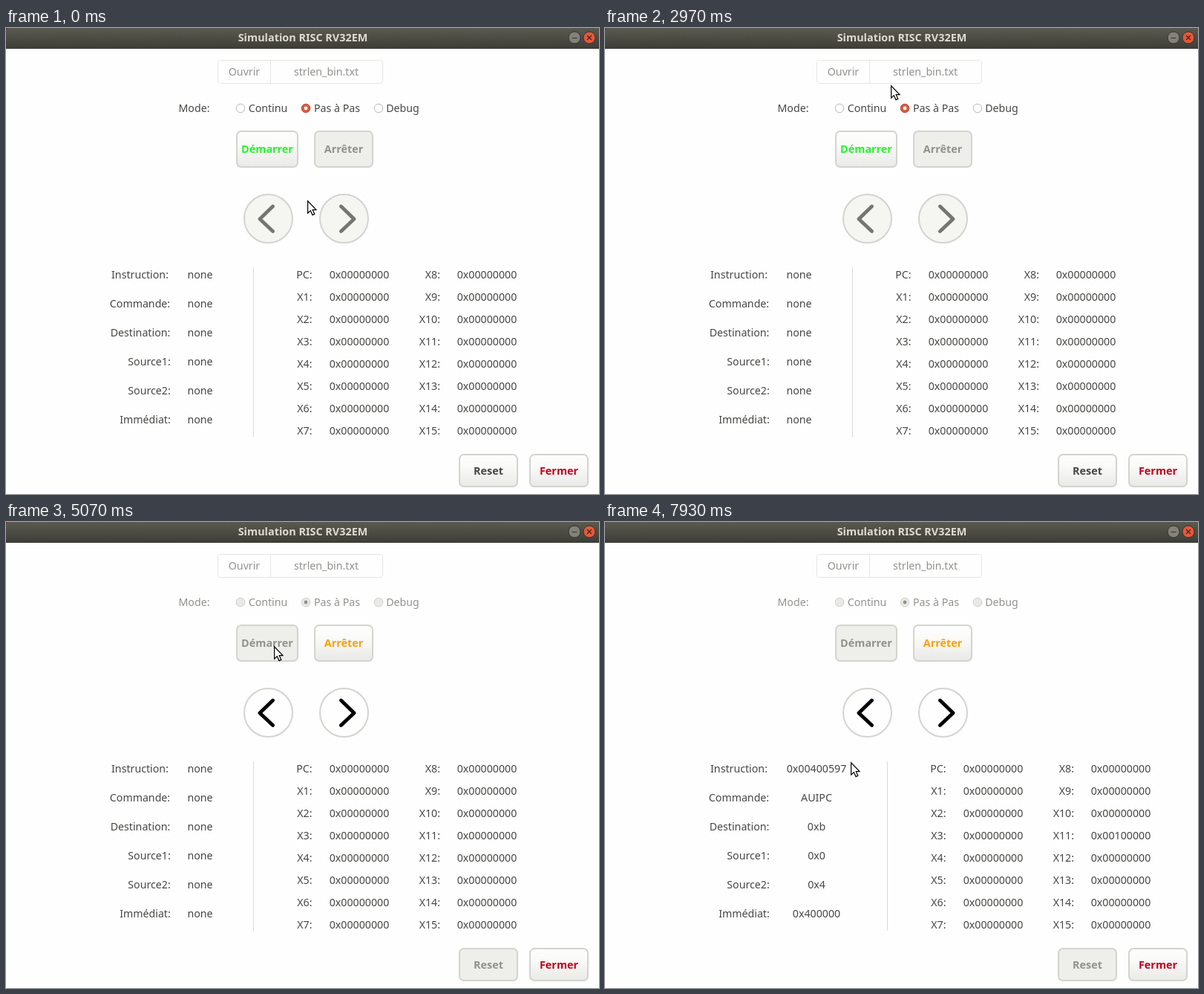
Recreate the animation shown at these times as an HTML page. Size 799 by 627 pixels, loop 8 s.

```html
<!DOCTYPE html>
<html lang="fr">
<head>
<meta charset="utf-8">
<title>Simulation RISC RV32EM</title>
<style>
html, body { margin: 0; width: 100%; height: 100%; overflow: hidden; background: #fefefe; }
svg { display: block; width: 799px; height: 627px; }
text { font: 14.2px "Noto Sans", "Open Sans", sans-serif; fill: #474744; }
.b { font-weight: 700; font-size: 14.4px; }
</style>
</head>
<body>
<svg id="stage" viewBox="0 0 799 627">
  <defs>
    <linearGradient id="bar" x2="0" y2="1">
      <stop stop-color="#5b5a50"/><stop offset="1" stop-color="#3d3d37"/>
    </linearGradient>
    <linearGradient id="face" x2="0" y2="1">
      <stop stop-color="#fefefe"/><stop offset=".35" stop-color="#fafaf9"/><stop offset="1" stop-color="#e9e9e6"/>
    </linearGradient>
    <linearGradient id="hover" gradientUnits="userSpaceOnUse" x1="0" y1="160" x2="0" y2="167">
      <stop stop-color="#1f7a22"/><stop offset="1" stop-color="#1fc923"/>
    </linearGradient>
  </defs>
</svg>
<script>
const NS = "http://www.w3.org/2000/svg";
const stage = document.getElementById("stage");
const LOOP = 8000;
const INK = "#474744", DIM = "#91918d", EDGE = "#d3d3cf", FLAT = "#eeeeeb";

function set(el, attrs) {
  for (const key in attrs) el.setAttribute(key, attrs[key]);
  return el;
}

function add(tag, attrs, parent = stage) {
  return parent.appendChild(set(document.createElementNS(NS, tag), attrs));
}

function label(str, x, y, anchor = "middle", cls = "", parent = stage) {
  const el = add("text", { x, y, "text-anchor": anchor, class: cls }, parent);
  el.textContent = str;
  return el;
}

const paint = (el, fill) => { el.style.fill = fill; };

function button(str, x, y, width, height) {
  const box = add("rect", { x, y, width, height, rx: 6, fill: "url(#face)", stroke: EDGE, "stroke-width": 2 });
  const text = label(str, x + width / 2, y + height / 2 + 5, "middle", "b");
  return (on, color, fill = "url(#face)") => {
    set(box, { fill: on ? fill : FLAT });
    paint(text, on ? color : DIM);
  };
}

function arrow(cx, tip, end) {
  const ring = add("circle", { cx, cy: 256.5, r: 32.5, "stroke-width": 2 });
  const mark = add("path", {
    d: `M${end} 240L${tip} 257L${end} 273.5`, fill: "none",
    "stroke-width": 4.8, "stroke-linecap": "round", "stroke-linejoin": "round"
  });
  return (on, edge) => {
    set(ring, { fill: on ? "#fefefe" : "#f5f5f2", stroke: edge });
    set(mark, { stroke: on ? "#000" : "#757571" });
  };
}

// Title bar
add("rect", { width: 8, height: 8, fill: "#7c1f24" });
add("path", { d: "M0 28V4Q0 0 4 0H799V28Z", fill: "url(#bar)" });
paint(label("Simulation RISC RV32EM", 400, 18, "middle", "b"), "#dfdbd2");
add("circle", { cx: 766, cy: 13, r: 8, fill: "#82817a", stroke: "#35342f" });
add("path", { d: "M762.5 13.5H769.5", stroke: "#35342f" });
add("circle", { cx: 786, cy: 13, r: 8, fill: "#e5593a", stroke: "#35342f" });
add("path", { d: "M783 10L789 16M789 10L783 16", stroke: "#45231a", "stroke-width": 1.2 });

// File chooser
add("rect", { x: 285.5, y: 43.5, width: 222, height: 31, rx: 3, fill: "none", stroke: "#e5e5e2" });
add("path", { d: "M356.5 44V74", stroke: "#e5e5e2" });
paint(label("Ouvrir", 321, 64), DIM);
paint(label("strlen_bin.txt", 431.5, 64), DIM);

// Mode selector
const modeTexts = [label("Mode:", 253.5, 113)];
const radios = [["Continu", 316, 353], ["Pas à Pas", 404, 446], ["Debug", 502, 534.5]].map(([str, cx, mid]) => {
  modeTexts.push(label(str, mid, 113));
  return add("circle", { cx, cy: 108, r: 5.8 });
});
const dot = add("circle", { cx: 404, cy: 108, r: 2.4 });

// Controls
const start = button("Démarrer", 311, 139, 82, 48);
const stop = button("Arrêter", 416, 139, 78, 48);
const reset = button("Reset", 611, 574, 78, 43);
button("Fermer", 706, 574, 78, 43)(true, "#c4001a");
const back = arrow(353.5, 342, 359.5);
const next = arrow(455.5, 469, 451.5);

// Decoded instruction
const fields = [
  ["Instruction:", 180.5, "0x00400597"],
  ["Commande:", 180.5, "AUIPC"],
  ["Destination:", 181, "0xb"],
  ["Source1:", 193, "0x0"],
  ["Source2:", 193, "0x4"],
  ["Immédiat:", 187.5, "0x400000"]
].map(([str, x, value], i) => {
  const y = 337 + 39 * i;
  label(str, x, y);
  return { el: label("none", 261.5, y), value };
});

// Registers
const bank = add("g", {});
add("path", { d: "M333.5 322V550", stroke: "#d9d9d6" }, bank);
const regs = Array.from({ length: 16 }, (_, i) => {
  const right = i > 7, y = 337 + 30 * (i % 8);
  label(i ? `X${i}:` : "PC:", right ? 585 : 412.5, y, "end", "", bank);
  return label("0x00000000", right ? 648 : 476, y, "middle", "", bank);
});

const pointer = add("path", {
  d: "M.6 .8V17.2L4.3 13.8L7 19.6L9.8 18.4L7.2 12.7H12Z",
  fill: "#fff", stroke: "#000", "stroke-width": 1.2
});

// Pointer keys: time, x, y
const path = [
  [0, 406, 232], [200, 408, 228], [400, 408, 228], [800, 407, 214], [970, 407, 214],
  [1270, 448, 155], [1470, 432, 112], [1670, 388, 85], [1770, 384, 84], [1970, 388, 90],
  [2270, 455, 78], [2470, 494, 72], [2670, 484, 73], [2770, 465, 69], [2970, 385, 77],
  [3270, 374, 108], [3570, 391, 147], [3670, 391, 146], [3870, 374, 173], [4070, 361, 169],
  [4170, 361, 169], [4270, 361, 167], [5270, 361, 167], [5870, 448, 254], [6170, 448, 254],
  [6270, 449, 255], [6370, 449, 255], [6400, 450, 256], [7300, 450, 256], [7900, 331, 323]
];

function snap(t) {
  const shift = t >= 1030 && t < 6400 ? 70 : 0;
  return Math.floor((t - shift) / 100) * 100 + shift;
}

function pointerAt(t) {
  const i = path.findIndex(key => key[0] > t);
  if (i < 0) return path[path.length - 1].slice(1);
  const a = path[i - 1], b = path[i];
  const u = (t - a[0]) / (b[0] - a[0]);
  return [1, 2].map(k => Math.round(a[k] + (b[k] - a[k]) * u));
}

function draw(t) {
  const running = t >= 5070, stepped = t >= 7000;
  const [x, y] = pointerAt(snap(t));
  set(pointer, { transform: `translate(${x} ${y})` });

  modeTexts.forEach(el => paint(el, running ? DIM : INK));
  radios.forEach((el, i) => {
    const picked = i === 1 && !running;
    set(el, {
      fill: running ? "#e9e9e6" : picked ? "#dc5a3c" : "#fff",
      stroke: running ? "#cfcfcb" : picked ? "#b94a31" : "#b9b9b5"
    });
  });
  set(dot, { fill: running ? "#91918d" : "#fff" });

  const over = x > 310 && x < 394 && y > 138 && y < 188;
  start(!running, over ? "url(#hover)" : "#27f32c", t >= 4900 ? "#e9e9e6" : "url(#face)");
  stop(running, "#f3a30f");
  reset(!running, INK);

  const inRing = Math.hypot(x - 455.5, y - 256.5) < 33;
  const ring = t >= 7030 || !inRing ? EDGE : t >= 6870 ? "#777774" : "#f0a51e";
  back(running, EDGE);
  next(running, running ? ring : EDGE);

  fields.forEach(({ el, value }) => {
    el.textContent = stepped ? value : "none";
    set(el, { x: stepped ? 285 : 261.5 });
  });
  regs[11].textContent = stepped ? "0x00100000" : "0x00000000";
  set(bank, { transform: `translate(${stepped ? 47 : 0} 0)` });
}

const began = performance.now();
function tick() {
  draw((performance.now() - began) % LOOP);
  requestAnimationFrame(tick);
}
draw(0);
requestAnimationFrame(tick);
</script>
</body>
</html>
```
